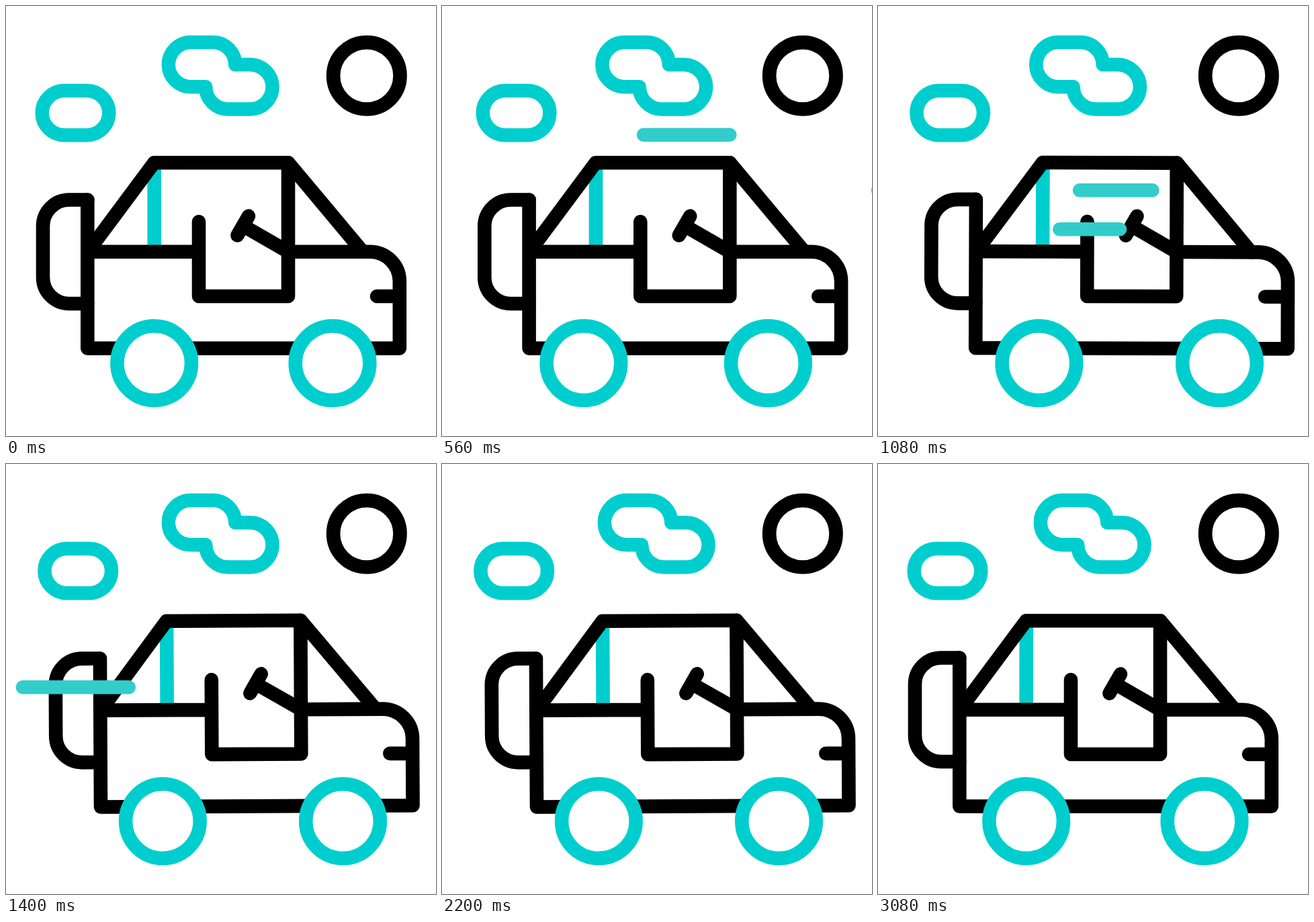
An HTML page for the animation above (3320 ms loop, 640 px wide and 640 px high).

```html
<!DOCTYPE html>
<html lang="en">
<head>
<meta charset="utf-8">
<title>Off-road car</title>
<style>
  html, body { margin: 0; width: 100%; height: 100%; overflow: hidden; background: #fff; }
  svg { display: block; width: 100vw; height: 100vh; fill: none; stroke: #000; stroke-width: 20.6; stroke-linecap: round; stroke-linejoin: round; }
  .teal { stroke: #00cece; }
  .wheel { fill: #fff; }
  #streaks { stroke: #32cdcb; }
</style>
</head>
<body>
<svg viewBox="0 0 640 640">
  <circle cx="536.8" cy="103.8" r="49.7"/>
  <rect id="puff" class="teal" x="53.7" y="126" width="99.6" height="66.2" rx="33.1"/>
  <path id="cloud" class="teal" d="M275 54H308A33.1 33.1 0 0 1 341.2 87.2H363.4A33.1 33.1 0 0 1 363.4 153.5H330.4A33.1 33.1 0 0 1 297.2 120.3H275A33.1 33.1 0 0 1 275 54Z"/>
  <g id="car">
    <path class="teal" stroke-linecap="butt" d="M220.7 233V366"/>
    <path d="M122 365.7L220.4 233.3H420.2L531 365.7"/>
    <path d="M122 365.7H287M287 321V432H420V233.3"/>
    <path d="M121.3 288.5V509.5H585.8V409.8A44.2 44.2 0 0 0 541.6 365.7H420M585.8 432H552"/>
    <path d="M121.3 288.5H94A39 39 0 0 0 55 327.5V404A39 39 0 0 0 94 443H121.3"/>
    <path d="M361 312.6L344.4 341.4M352.7 327L420 365.7"/>
  </g>
  <circle id="rear" class="teal wheel" cx="220.7" cy="531.6" r="55.3"/>
  <circle id="front" class="teal wheel" cx="486" cy="531.6" r="55.3"/>
  <path id="streaks"/>
</svg>
<script>
const LOOP = 3320, STEP = 40, LAG = 40;
const $ = id => document.getElementById(id);
const clamp = (v, min, max) => Math.min(max, Math.max(min, v));
const smooth = p => p * p * (3 - 2 * p);
const ramp = (t, from, to) => smooth(clamp((t - from) / (to - from), 0, 1));

// Eases from 0 to a, rocks between a and b, then eases back to 0
function rock(t, { lead, first, half, swings, end, a, b }) {
  const last = first + half * swings;
  const u = (clamp(t, first, last) - first) / half;
  const value = b + (a - b) * smooth(Math.abs(u % 2 - 1));
  return value * ramp(t, lead, first) * (1 - ramp(t, last, end));
}

const sway = (t, size) =>
  rock(t, { lead: 0, first: 400, half: 400, swings: 5, end: 2800, a: size, b: -size });

const tilt = t =>
  rock(t, { lead: 600, first: 800, half: 200, swings: 10, end: 3000, a: 1, b: -0.28 });

// Backs up, shoots forward and shakes there
const drive = t =>
  rock(t, { lead: 328, first: 688, half: 200, swings: 10, end: 3000, a: 24.3, b: 11.8 })
  - 31 * ramp(t, 0, 328) * (1 - ramp(t, 328, 688));

// A line drawn leftwards along its track, its tail following the head
function streak(t, start, y, from = 650, travel = 350) {
  const head = from - 0.767 * (t - start);
  const left = Math.max(head, from - travel);
  const right = Math.min(head + 158, from);
  return left < right ? `M${left} ${y}H${right}` : '';
}

const move = (id, x, extra = '') => $(id).setAttribute('transform', `translate(${x})${extra}`);

function draw(now) {
  const t = Math.floor(now % LOOP / STEP) * STEP;
  move('car', drive(t), `rotate(${tilt(t)} 318 400)`);
  move('front', drive(t - LAG));
  move('rear', drive(t - 2 * LAG));
  move('cloud', sway(t, -11.6));
  move('puff', sway(t - LAG, 12.5));
  $('streaks').setAttribute('d',
    streak(t, 65, 191.8) +
    streak(t, 559, 274.3) +
    streak(t, 963, 332.2, 360) +
    streak(t, 1412, 274.3, 480, 200) +
    streak(t, 2290, 405.6));
}

const begin = performance.now();
function tick() {
  draw(performance.now() - begin);
  requestAnimationFrame(tick);
}
tick();
</script>
</body>
</html>
```
